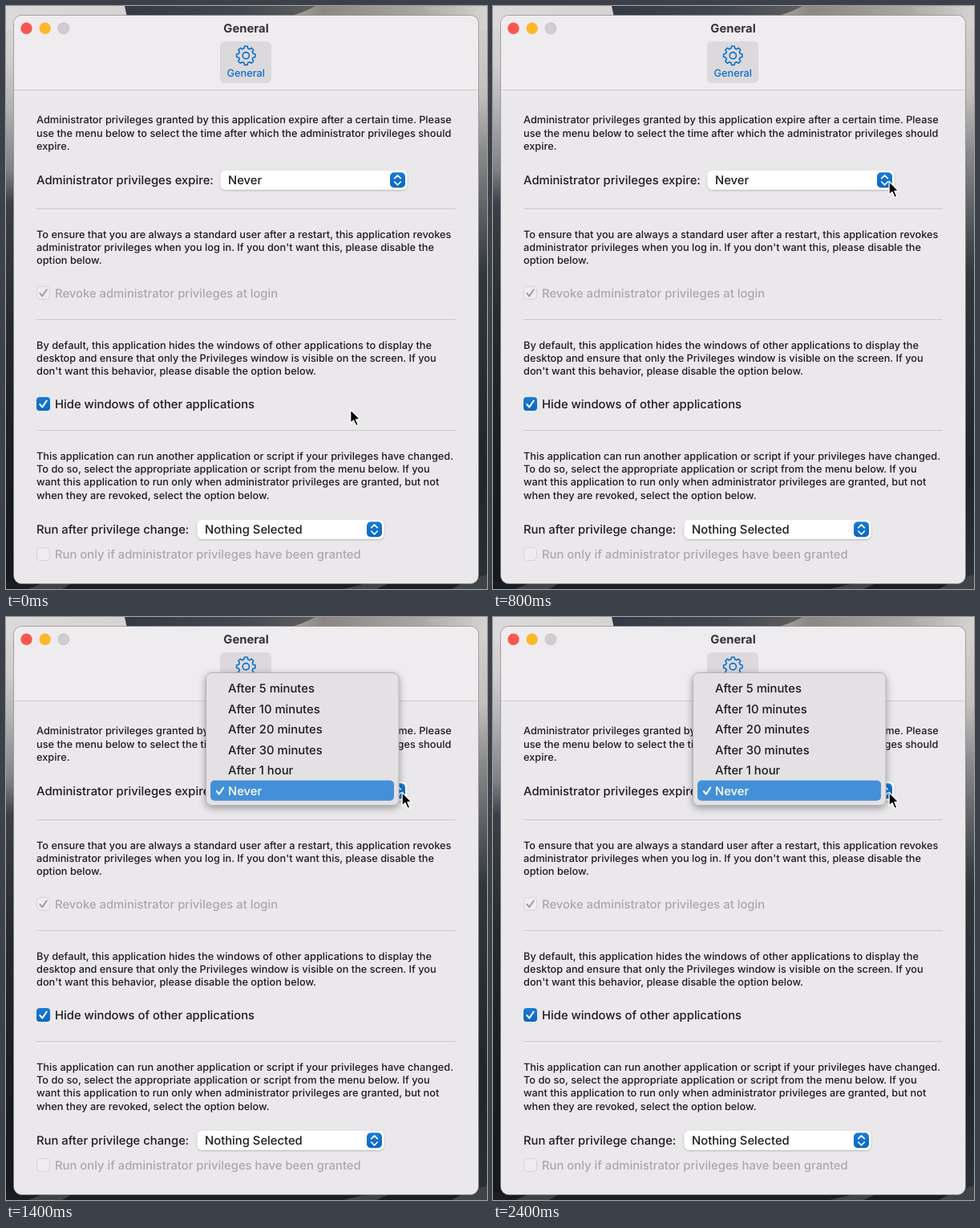
Animation, 600 px wide and 726 px high, one loop 2.5 s. Source, as an HTML page:

```html
<!DOCTYPE html>
<html lang="en">
<head>
<meta charset="utf-8">
<title>General</title>
<style>
  html, body { margin: 0; width: 100%; height: 100%; overflow: hidden; background: #20242a; }
  svg { display: block; width: 600px; height: 726px; }
  text { font: 450 14.8px Inter, Roboto, sans-serif; fill: #1d1c1e; white-space: pre; text-rendering: geometricPrecision; }
  .small { font-size: 12.78px; }
  .title { font-size: 14.8px; font-weight: 650; fill: #343335; }
  .off { fill: #aaa8aa; }
  .blue { fill: #0b6fcb; }
  .mid { text-anchor: middle; }
  .white { fill: #fff; }
  .line { fill: none; stroke-linecap: round; stroke-linejoin: round; }
</style>
</head>
<body>
<svg viewBox="0 0 600 726">
  <defs>
    <linearGradient id="left" x2="0" y2="1">
      <stop offset="0" stop-color="#dbd9d9"/>
      <stop offset=".1" stop-color="#cfcdce"/>
      <stop offset=".18" stop-color="#b0afb2"/>
      <stop offset=".28" stop-color="#7f8186"/>
      <stop offset=".34" stop-color="#3c4046"/>
      <stop offset=".55" stop-color="#25292c"/>
      <stop offset=".8" stop-color="#1a1d20"/>
      <stop offset="1" stop-color="#15181c"/>
    </linearGradient>
    <linearGradient id="right" x2="0" y2="1">
      <stop offset="0" stop-color="#d6d3d1"/>
      <stop offset=".15" stop-color="#c2bfbd"/>
      <stop offset=".25" stop-color="#8b8a8b"/>
      <stop offset=".36" stop-color="#5a5d61"/>
      <stop offset=".46" stop-color="#32373c"/>
      <stop offset=".8" stop-color="#20252b"/>
      <stop offset="1" stop-color="#2c3137"/>
    </linearGradient>
    <linearGradient id="ridge">
      <stop offset="0" stop-color="#343a45"/>
      <stop offset=".6" stop-color="#424751"/>
      <stop offset="1" stop-color="#5f5e5d"/>
    </linearGradient>
    <linearGradient id="sky">
      <stop offset="0" stop-color="#dbd9d9"/>
      <stop offset=".5" stop-color="#d2cfcc"/>
      <stop offset=".66" stop-color="#8b8780"/>
      <stop offset=".86" stop-color="#aaa6a0"/>
      <stop offset="1" stop-color="#d6d3d1"/>
    </linearGradient>
    <linearGradient id="button" x2="0" y2="1">
      <stop offset="0" stop-color="#1a7bd6"/>
      <stop offset="1" stop-color="#0867c2"/>
    </linearGradient>
    <filter id="shade" x="-10%" y="-10%" width="120%" height="120%">
      <feDropShadow dx="0" dy="3" stdDeviation="5" flood-opacity=".35"/>
    </filter>
    <filter id="soft" x="-10%" y="-30%" width="120%" height="160%">
      <feDropShadow dx="0" dy=".8" stdDeviation=".8" flood-opacity=".28"/>
    </filter>
    <path id="tick" class="line" d="M4.3 9 7.3 12.6 12.7 4.5" stroke-width="2"/>
    <g id="popup">
      <rect width="233" height="24" rx="6" fill="#fff" filter="url(#soft)"/>
      <rect x="211.5" y="2.5" width="19" height="19" rx="5" fill="url(#button)"/>
      <path class="line" d="M217.2 9.8 221 6l3.8 3.8M217.2 14.2 221 18l3.8-3.8" stroke="#fff" stroke-width="1.7"/>
    </g>
  </defs>

  <!-- desktop -->
  <rect width="300" height="726" fill="url(#left)"/>
  <rect x="300" width="300" height="726" fill="url(#right)"/>
  <rect width="600" height="30" fill="url(#sky)"/>
  <path d="M148 0H386Q372 8 350 14H151Z" fill="url(#ridge)"/>
  <path d="M0 716H600V726H0" fill="#1a1d22"/>
  <path d="M28 726 45 719H82L70 726M420 726 450 719H478L462 726M556 726 574 716 600 708V726" fill="#3f4348"/>
  <path d="M527 4H545" stroke="#d5d3d0" stroke-dasharray="2 1" opacity=".5"/>

  <!-- window -->
  <rect x="9.5" y="11.5" width="580" height="708" rx="10" fill="#ebe8eb" stroke="#77777a" stroke-width=".6"/>
  <path d="M10 104V22a10 10 0 0 1 10-10H579a10 10 0 0 1 10 10V104" fill="#efecef"/>
  <path d="M10 104.5H589" stroke="#cfccd0"/>
  <circle cx="25.5" cy="27.800" r="7.200" fill="#f8574f"/>
  <circle cx="48.700" cy="27.800" r="7.200" fill="#fcb829"/>
  <circle cx="71.900" cy="27.800" r="7" fill="#d0cdd0" stroke="#b9b6b9" stroke-width=".6"/>
  <rect x="267" y="44" width="64" height="52" rx="6" fill="#dcd9dc"/>
  <g class="line" transform="translate(299.3 61.7)" stroke="#0b6fcb" stroke-width="1.6">
    <path id="gear"/>
    <circle r="4.1"/>
  </g>
  <path d="M38 252.5H560.5M38 390.5H560.5M38 528.5H560.5" stroke="#cbc8cb"/>
  <use href="#popup" x="267.5" y="204.8"/>
  <use href="#popup" x="238.5" y="639.8"/>
  <g transform="translate(38 348.7)">
    <rect x=".5" y=".5" width="16" height="16" rx="4" fill="#efecef" stroke="#d6d3d6"/>
    <use href="#tick" stroke="#9f9d9f"/>
  </g>
  <g transform="translate(38 487)">
    <rect width="17" height="17" rx="4" fill="url(#button)"/>
    <use href="#tick" stroke="#fff"/>
  </g>
  <rect x="38.5" y="674.5" width="16" height="16" rx="4" fill="#efecef" stroke="#d6d3d6"/>
  <g id="labels"></g>

  <g id="menu">
    <rect x="249.5" y="69.5" width="240.5" height="165" rx="7" fill="#e4e1e4" stroke="#b3b1b3" filter="url(#shade)"/>
    <rect x="255" y="203.5" width="229" height="25.3" rx="5" fill="#4390d8"/>
    <use href="#tick" x="258.5" y="208" stroke="#fff"/>
  </g>
  <path id="cursor" d="M0 0V17L3.9 13.4 6.9 20.2 9.7 19 6.8 12.3H12Z" fill="#050505" stroke="#fff" stroke-width="1.3" stroke-linejoin="round"/>
</svg>
<script>
const $ = id => document.getElementById(id);

function label(text, x, y, style = '', parent = $('labels')) {
  const node = document.createElementNS('http://www.w3.org/2000/svg', 'text');
  node.setAttribute('x', x);
  node.setAttribute('y', y);
  node.setAttribute('class', style);
  node.textContent = text;
  parent.append(node);
}

const paragraph = (y, text) =>
  text.split('\n').forEach((line, i) => label(line, 38, y + i * 16.3, 'small'));

label('General', 299.5, 32.5, 'title mid');
label('General', 299.2, 88.3, 'small blue mid');

paragraph(146.3, `Administrator privileges granted by this application expire after a certain time. Please
use the menu below to select the time after which the administrator privileges should
expire.`);
label('Administrator privileges expire:', 38, 221.6);
label('Never', 277, 221.6);

paragraph(288.8, `To ensure that you are always a standard user after a restart, this application revokes
administrator privileges when you log in. If you don't want this, please disable the
option below.`);
label('Revoke administrator privileges at login', 61, 362.9, 'off');

paragraph(426.8, `By default, this application hides the windows of other applications to display the
desktop and ensure that only the Privileges window is visible on the screen. If you
don't want this behavior, please disable the option below.`);
label('Hide windows of other applications', 61, 500.9);

paragraph(564.8, `This application can run another application or script if your privileges have changed.
To do so, select the appropriate application or script from the menu below. If you
want this application to run only when administrator privileges are granted, but not
when they are revoked, select the option below.`);
label('Run after privilege change:', 38, 656.6);
label('Nothing Selected', 248, 656.6);
label('Run only if administrator privileges have been granted', 61, 687.9, 'off');

['After 5 minutes', 'After 10 minutes', 'After 20 minutes', 'After 30 minutes', 'After 1 hour', 'Never']
  .forEach((text, i) => label(text, 277, 94.1 + i * 25.5, i == 5 ? 'white' : '', $('menu')));

// Eight teeth, four corners each: [angle offset, radius]
const corners = [[-.27, 9.2], [-.15, 11.8], [.15, 11.8], [.27, 9.2]];
const gear = [];
for (let tooth = 0; tooth < 8; tooth++)
  for (const [offset, r] of corners) {
    const a = tooth * Math.PI / 4 + offset;
    gear.push(`${r * Math.sin(a)} ${-r * Math.cos(a)}`);
  }
$('gear').setAttribute('d', `M${gear.join('L')}Z`);

const ease = p => p * p * (3 - 2 * p);
const mix = (a, b, p) => a + (b - a) * p;
const clamp = p => Math.max(0, Math.min(1, p));

function draw(now) {
  const t = Math.floor(now % 2500 / 100) * 100;
  const travel = ease(clamp(t / 500));
  const settle = clamp((t - 500) / 200);
  const x = mix(429.7, 492.7, travel) + 1.4 * settle;
  const y = mix(502.5, 224.2, travel) - 6 * settle;
  $('cursor').setAttribute('transform', `translate(${x} ${y})`);
  $('menu').style.display = t < 1100 ? 'none' : '';
}

const start = performance.now();
function tick() {
  draw(performance.now() - start);
  requestAnimationFrame(tick);
}
tick();
</script>
</body>
</html>
```
